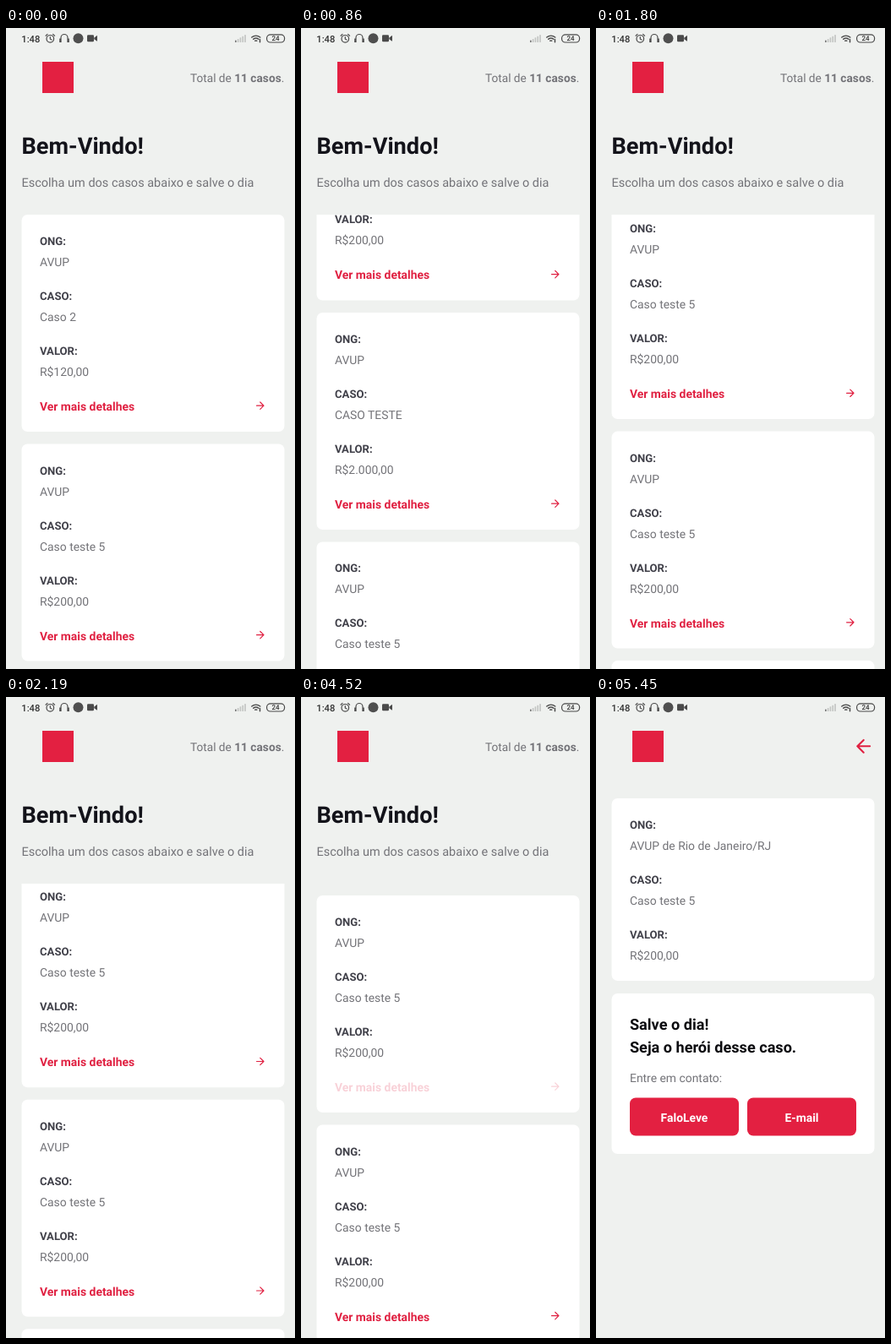
An HTML page that plays this animation: 342x759 px, repeating every 8 s.

```html
<!DOCTYPE html>
<html lang="pt">
<head>
<meta charset="utf-8">
<title>Casos</title>
<style>
html, body { margin: 0; height: 100%; overflow: hidden; background: #eff1ef; }
svg { display: block; width: 100vw; height: 100vh; }
text { font: 13.9px Roboto, sans-serif; fill: #737378; text-rendering: geometricPrecision; white-space: pre; }
.bold { font-weight: 700; }
.label { font-weight: 700; font-size: 13.1px; fill: #41414a; }
.link { font-weight: 700; fill: #e02041; }
.title { font-weight: 700; font-size: 27.2px; fill: #13131a; }
.sub { font-size: 14.5px; }
.hero { font-weight: 700; font-size: 18.1px; fill: #0c0c10; }
.btn { font-weight: 700; fill: #fff; text-anchor: middle; }
.clock { font-weight: 500; font-size: 11.2px; fill: #333; }
.charge { font-weight: 500; font-size: 8px; fill: #333; text-anchor: middle; }
.total { font-size: 13.7px; text-anchor: end; }
.arrow { fill: none; stroke: #e02041; stroke-width: 2; stroke-linecap: round; stroke-linejoin: round; }
.icon { fill: none; stroke: #4a4a4a; stroke-width: 1.2; stroke-linecap: round; }
</style>
</head>
<body>
<svg id="stage" viewBox="0 0 342 759" preserveAspectRatio="none"></svg>
<script>
const LOOP = 8000, PITCH = 271.5, LIST_TOP = 221, PRESSED = 5;
const RED = '#e32041', BG = '#eff1ef', H = 759;

const text = (x, y, cls, s) => `<text x="${x}" y="${y}" class="${cls}">${s}</text>`;
const rect = (x, y, w, h, r, fill) =>
  `<rect x="${x}" y="${y}" width="${w}" height="${h}" rx="${r}" fill="${fill}"/>`;
const arrow = (x, y, scale, turn = 0) =>
  `<path class="arrow" transform="translate(${x} ${y}) rotate(${turn}) scale(${scale})" d="M-7 0H7M0-7 7 0 0 7"/>`;

const fields = (ong, caso, valor) =>
  [['ONG:', ong], ['CASO:', caso], ['VALOR:', valor]].map(([name, value], i) =>
    text(40, 36 + 65 * i, 'label', name) + text(40, 61 + 65 * i, '', value)).join('');

const card = (caso, valor, i) => `<g transform="translate(0 ${LIST_TOP + PITCH * i})">
  ${rect(18.5, 0, 311, 257, 7, '#fff')}${fields('AVUP', caso, valor)}
  <g id="link${i}">${text(40, 232, 'link', 'Ver mais detalhes')}${arrow(300.8, 226.2, 0.6)}</g></g>`;

const button = (x, s) => rect(x, 474.5, 129, 45, 7, RED) + text(x + 64.5, 502.5, 'btn', s);

const cases = Array.from({ length: 11 }, () => ['Caso teste 5', 'R$200,00']);
cases[0] = ['Caso 2', 'R$120,00'];
cases[2] = ['CASO TESTE', 'R$2.000,00'];

const logo = rect(43, 40, 37, 37, 0, RED);

const listScreen = logo +
  text(329.3, 64, 'total', 'Total de <tspan class="bold">11 casos</tspan>.') +
  text(18.5, 148.5, 'title', 'Bem-Vindo!') +
  text(18.5, 187.5, 'sub', 'Escolha um dos casos abaixo e salve o dia') +
  `<g clip-path="url(#listClip)"><g id="list">${cases.map((c, i) => card(...c, i)).join('')}</g></g>`;

const detailScreen = rect(0, -40, 342, H + 80, 0, BG) + logo + arrow(316.7, 58.3, 1.06, 180) +
  rect(18.5, 120, 311, 216, 7, '#fff') +
  `<g transform="translate(0 120)">${fields('AVUP de Rio de Janeiro/RJ', 'Caso teste 5', 'R$200,00')}</g>` +
  rect(18.5, 351, 311, 190, 7, '#fff') +
  text(40, 393.5, 'hero', 'Salve o dia!') + text(40, 421, 'hero', 'Seja o herói desse caso.') +
  text(40, 456, '', 'Entre em contato:') + button(40, 'FaloLeve') + button(179, 'E-mail');

const bars = [0, 1, 2, 3, 4].map(i =>
  rect(271 + 2.8 * i, 14.5 - 1.6 * i, 1.7, 2.5 + 1.6 * i, 0.4, i ? '#c3c5c3' : '#777')).join('');

const statusBar = text(18.3, 16.6, 'clock', '1:48') +
  `<g class="icon"><circle cx="52.3" cy="12.8" r="4.3"/><path d="M52.3 10.5V13L54 14M47 9.2 49 7.4M57.6 9.2 55.6 7.4"/>
   <path d="M65 14V11.5a4 4 0 0 1 8 0V14M65 13.2v3.2h-1.2v-3.2zM73 13.2v3.2h1.2v-3.2z"/>
   <path stroke-width="1.5" d="M290.8 11a8 8 0 0 1 10 0M292.8 13.2a5 5 0 0 1 6 0M294.8 15.2a2 2 0 0 1 2 0M300.5 13.4v3.4"/>
   <rect x="308.6" y="7.8" width="21" height="9.2" rx="4.3"/></g>
   <circle cx="85.5" cy="12.2" r="6" fill="#4f4f4f"/>` +
  rect(96, 8.3, 8, 8, 1.2, '#4a4a4a') +
  '<path d="M104.3 11.5 108 8.8V15.8L104.3 13.2z" fill="#4a4a4a"/>' +
  bars + text(319, 15.2, 'charge', '24');

const $ = id => document.getElementById(id);
$('stage').innerHTML = `<defs>
  <clipPath id="listClip"><rect y="${LIST_TOP}" width="342" height="600"/></clipPath>
  <clipPath id="reveal"><rect id="revealBox" width="342" height="${H + 40}"/></clipPath></defs>
  ${rect(0, 0, 342, H, 0, BG)}
  <g id="home">${listScreen}</g>
  <rect id="shade" width="342" height="${H}"/>
  <g clip-path="url(#reveal)"><g id="detail">${detailScreen}</g></g>${statusBar}`;

// Three flicks: time, scroll offset, speed in px per ms
const path = [
  [30, 0, 0], [440, 190, 0.95], [810, 427, 0],
  [860, 427, 0], [1320, 602, 0.95], [1650, 820, 0],
  [1720, 820, 0], [2190, 1100.6, 1.1], [2520, 1330, 0.1], [2750, 1343.5, 0]
];

function scrollAt(t) {
  const i = path.findIndex(p => p[0] > t);
  if (i === 0) return 0;
  if (i < 0) return path[path.length - 1][1];
  const [t0, y0, v0] = path[i - 1], [t1, y1, v1] = path[i];
  const d = t1 - t0, u = (t - t0) / d, w = 1 - u;
  return w * w * ((1 + 2 * u) * y0 + u * d * v0) + u * u * ((3 - 2 * u) * y1 - w * d * v1);
}

const clamp = x => Math.min(1, Math.max(0, x));

function draw(t) {
  const press = t < 4520 ? 1 : 0.2 + 0.8 * clamp((t - 4530) / 90);
  const p = 1 - (1 - clamp((t - 4770) / 660)) ** 4.6;
  $('list').setAttribute('transform', `translate(0 ${-scrollAt(t)})`);
  $('link' + PRESSED).setAttribute('opacity', press);
  $('home').setAttribute('transform', `translate(0 ${-0.02 * H * p})`);
  $('shade').setAttribute('opacity', 0.1 * clamp(p / 0.36));
  $('revealBox').setAttribute('y', H * (1 - p));
  $('detail').setAttribute('transform', `translate(0 ${0.041 * H * (1 - p)})`);
}

const start = performance.now();
function tick() {
  draw((performance.now() - start) % LOOP);
  requestAnimationFrame(tick);
}
tick();
</script>
</body>
</html>
```
